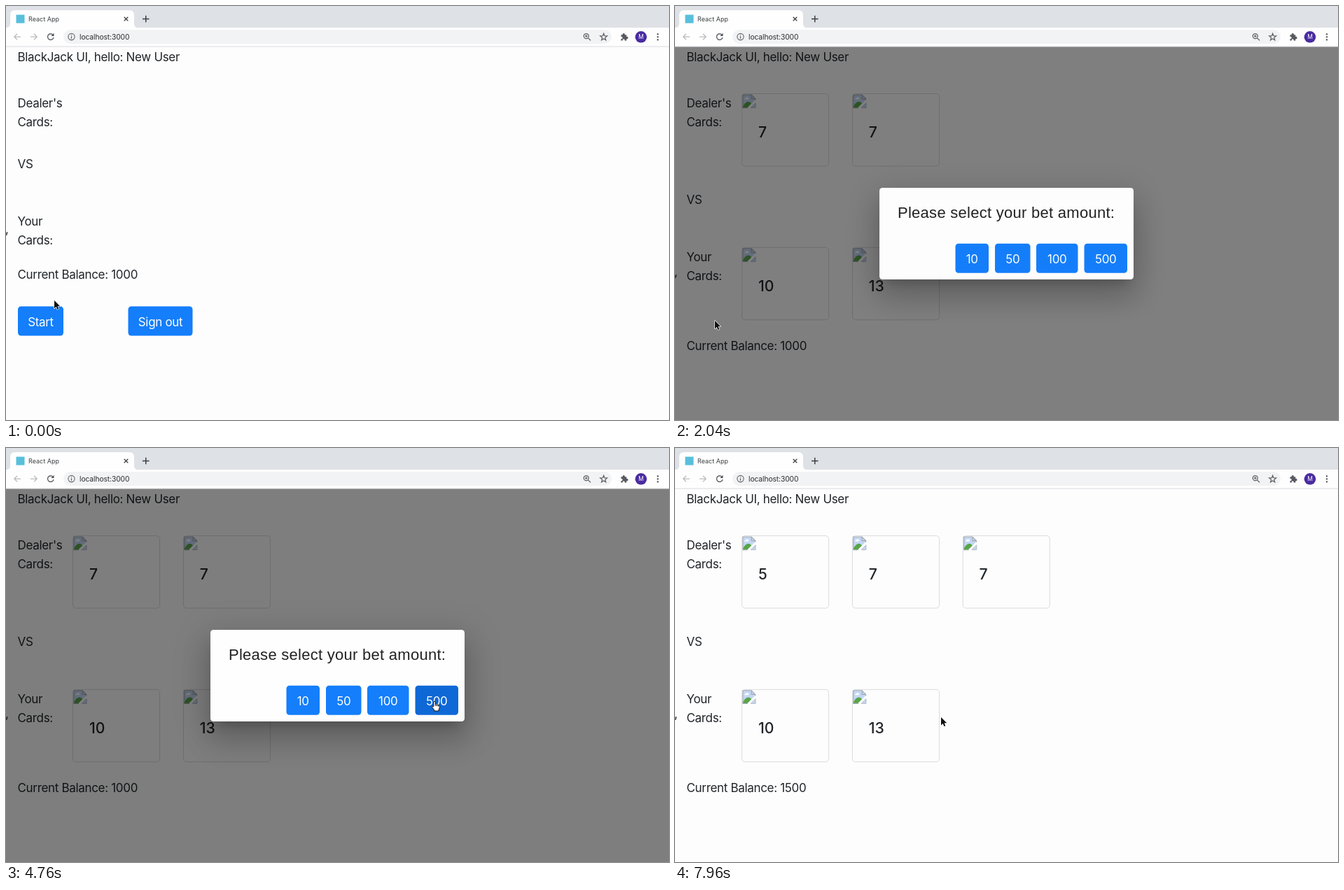
An HTML page that plays this animation: 947x592 px, repeating every 8 s.

```html
<!DOCTYPE html>
<html lang="en">
<head>
<meta charset="utf-8">
<title>Blackjack table</title>
<style>
  html, body { margin: 0; width: 100%; height: 100%; overflow: hidden; background: #fdfdfe; }
  svg { display: block; }
  text { font-family: Inter, Roboto, sans-serif; font-size: 17px; letter-spacing: -.019em; fill: #212529; white-space: pre; }
  .label { text-anchor: middle; fill: #fff; }
  .value { font-size: 21.2px; font-weight: 500; letter-spacing: 0; }
  .prompt { font-family: "Liberation Sans", Arial, sans-serif; font-size: 22px; letter-spacing: .0124em; fill: #222; }
  .icon { fill: none; stroke: #5f6368; stroke-width: 1.25; }
</style>
</head>
<body>
<svg id="stage" width="947" height="592" viewBox="0 0 947 592" xmlns="http://www.w3.org/2000/svg">
  <defs>
    <g id="broken">
      <path d="M.7.7H13L18.6 6.3V10L9 19.3H.7Z" fill="#c3d7f5"/>
      <path d="M3 7.2q.2-2 2.1-2 .8-2 2.8-1 1.600.8 1.200 3Z" fill="#fff"/>
      <path d="M.7 17.500Q4.500 10.500 8.500 10.500 11.500 10.500 13.800 14.500L9 19.300H.7Z" fill="#58a548"/>
      <path d="M19.300 8.500 8 19.800" stroke="#fdfdfe" stroke-width="2.200"/>
      <path d="M7.500 19.300H.7V.7H13L18.600 6.300V8.500M13 .7V6.300H18.600" fill="none" stroke="#a5a9ae" stroke-width="1.100"/>
      <path d="M18.900 12.500V19.300H12Z" fill="#c3d7f5" stroke="#a5a9ae" stroke-width=".7"/>
    </g>
    <filter id="soft1" x="-20%" y="-50%" width="140%" height="200%"><feGaussianBlur stdDeviation="8"/></filter>
    <filter id="soft2" x="-30%" y="-80%" width="160%" height="260%"><feGaussianBlur stdDeviation="21"/></filter>
    <filter id="soft3" x="-30%" y="-80%" width="160%" height="260%"><feGaussianBlur stdDeviation="25"/></filter>
  </defs>

  <rect width="947" height="592" fill="#fdfdfe"/>
  <text x="16.500" y="78.500">BlackJack UI, hello: New User</text>
  <text x="16.500" y="145.300">Dealer's</text>
  <text x="16.500" y="171.800">Cards:</text>
  <g id="cards"></g>
  <g id="lower">
    <text x="16.500" y="231.500">VS</text>
    <text x="16.500" y="314">Your</text>
    <text x="16.500" y="340.500">Cards:</text>
  </g>
  <text id="balance" x="16.500"></text>
  <text id="comma" x="-1">,</text>
  <g id="actions"></g>

  <rect id="shade" y="58" width="947" height="534"/>
  <g id="dialog">
    <rect x="299.700" y="280" width="347.600" height="115" opacity=".2" filter="url(#soft1)"/>
    <rect x="289" y="283" width="370" height="138" opacity=".14" filter="url(#soft2)"/>
    <rect x="283" y="261" width="381" height="149" opacity=".12" filter="url(#soft3)"/>
    <rect x="292" y="260" width="363" height="131" rx="4.400" fill="#fefefe"/>
    <text class="prompt" x="318" y="303">Please select your bet amount:</text>
    <g id="bets"></g>
  </g>

  <g id="browser">
    <rect width="947" height="31" fill="#dee1e5"/>
    <path d="M0 31Q6 31 6 25V13Q6 6 13 6H176Q183 6 183 13V25Q183 31 189 31H947V58H0Z" fill="#fefefe"/>
    <path d="M0 58H947" stroke="#d9dadd"/>
    <rect x="14.500" y="12.500" width="12" height="12" fill="#58bfdc"/>
    <text x="32" y="21.500" style="font-size:9px;letter-spacing:0;fill:#3c4043">React App</text>
    <path class="icon" d="M168.700 15.700l5.600 5.600m0-5.600-5.600 5.600" style="stroke:#3c4043"/>
    <path class="icon" d="M195 18.500H204.500M199.750 13.750V23.250" style="stroke:#3c4043;stroke-width:1.500"/>
    <rect x="82" y="34" width="783" height="20" rx="10" fill="#f1f3f4"/>
    <path class="icon" d="M21 44H12M16 39.800 11.800 44 16 48.200M35 44H44M40 39.800 44.200 44 40 48.200" style="stroke:#b9bbbe"/>
    <path class="icon" d="M67 41.200A4.300 4.300 0 1 0 68 45" style="stroke-width:1.400"/>
    <path d="M68.500 38.800V43H64.300Z" fill="#4d5156"/>
    <circle class="icon" cx="93.500" cy="44" r="4.600" style="stroke-width:1.100"/>
    <path class="icon" d="M93.500 43.200V46.700M93.500 41.200V42.300"/>
    <text x="105" y="47.800" style="font-size:10.300px;letter-spacing:-.01em;fill:#2b2d30">localhost:3000</text>
    <circle class="icon" cx="828.800" cy="43" r="3.500"/>
    <path class="icon" d="M831.400 45.600 835 49.200M827 43H830.600M828.800 41.200V44.800"/>
    <path id="star" class="icon"/>
    <path d="M878.500 41.300h2.200a1.700 1.700 0 1 1 3.200 0h2.400v2.600a1.700 1.700 0 1 1 0 3.200v2.400h-2.600a1.600 1.600 0 1 0-2.900 0h-2.300v-2.600a1.600 1.600 0 1 0 0-3Z" fill="#565a5f"/>
    <circle cx="907" cy="44.300" r="8.300" fill="#4a2ba0"/>
    <text class="label" x="907" y="47.400" style="font-size:8.500px">M</text>
    <g fill="#5f6368"><circle cx="931" cy="40.300" r="1.200"/><circle cx="931" cy="44.300" r="1.200"/><circle cx="931" cy="48.300" r="1.200"/></g>
  </g>

  <g id="pointer" stroke-linejoin="round">
    <path id="arrow" d="M0 0V11.500L2.700 9 4.400 13 6.300 12.200 4.600 8.300H8.200Z" fill="#111" stroke="#fff" stroke-width="1.300" paint-order="stroke"/>
    <path id="hand" d="M-1.300 1Q0-.8 1.200 1V4.500Q2.600 3.700 3.400 5 4.800 4.500 5.400 5.600 7.200 5.300 7.200 7.200V9.500L6 12.700V14H-.2V12.800L-3.600 8.300Q-3.600 6.500-1.300 8Z M1.200 4.500V7M3.400 5V7.200M5.400 5.600V7.600" fill="#fff" stroke="#111" stroke-width="1"/>
  </g>
</svg>
<script>
const LOOP = 8000;
const START = 1840, BET = 4860, STAND = 6600;
const BLUE = [20, 126, 251], DARK = [14, 104, 214];
const NS = "http://www.w3.org/2000/svg";
const $ = id => document.getElementById(id);

// time, x, y of the pointer's resting and turning points
const PATH = [
  [0, 69, 421], [800, 61, 448], [1160, 61, 448], [1400, 59, 450],
  [1900, 57, 450], [2160, 57, 450], [2840, 410, 410], [3640, 608, 360],
  [4480, 612, 362], [5440, 612, 362], [6240, 211, 552], [6760, 211, 552], [7700, 380, 385]
];

function add(parent, name, attrs, content = "") {
  const node = document.createElementNS(NS, name);
  for (const key in attrs) node.setAttribute(key, attrs[key]);
  node.textContent = content;
  parent.append(node);
  return node;
}

function makeButton(parent, label, x, y, w, phase) {
  const group = add(parent, "g", {});
  const rect = add(group, "rect", { x, y, width: w, height: 42, rx: 4.4 });
  add(group, "text", { x: x + w / 2, y: y + 28, class: "label" }, label);
  return { group, rect, x, y, w, phase };
}

function makeCard(x, y) {
  const group = add($("cards"), "g", { transform: `translate(${x} ${y})` });
  add(group, "rect", { width: 124, height: 103.5, rx: 4.4, fill: "none", stroke: "#dbdbdc" });
  add(group, "use", { href: "#broken", x: .6, y: .8 });
  const value = add(group, "text", { x: 23.3, y: 62.8, class: "value" });
  return { group, value };
}

const buttons = [
  makeButton($("actions"), "Start", 17, 429.5, 65, "idle"),
  makeButton($("actions"), "Sign out", 174.5, 429.5, 92, "idle"),
  makeButton($("actions"), "Hit", 17, 531.5, 50.5, "play"),
  makeButton($("actions"), "Stand", 174.5, 531.5, 74, "play"),
  makeButton($("bets"), "10", 400.5, 339.7, 47.5, "bet"),
  makeButton($("bets"), "50", 457, 339.7, 50.5, "bet"),
  makeButton($("bets"), "100", 516, 339.7, 59.5, "bet"),
  makeButton($("bets"), "500", 584.5, 339.7, 61.5, "bet")
];
const dealer = [0, 1, 2].map(i => makeCard(95.6 + 157.83 * i, 125.5));
const player = [0, 1].map(i => makeCard(95.6 + 157.83 * i, 345.3));

const starPoints = Array.from({ length: 10 }, (_, i) => {
  const r = i % 2 ? 2.2 : 5.2, a = i * Math.PI / 5;
  return (853.7 + r * Math.sin(a)).toFixed(2) + " " + (44.5 - r * Math.cos(a)).toFixed(2);
});
$("star").setAttribute("d", "M" + starPoints.join("L") + "Z");

const clamp = v => Math.max(0, Math.min(1, v));
const smooth = v => v * v * (3 - 2 * v);

// cubic-bezier(.4, 0, .2, 1)
function standardEase(x) {
  let lo = 0, hi = 1;
  for (let i = 0; i < 18; i++) {
    const s = (lo + hi) / 2, r = 1 - s;
    if (3 * r * r * s * .4 + 3 * r * s * s * .2 + s ** 3 < x) lo = s; else hi = s;
  }
  return 3 * (1 - lo) * lo * lo + lo ** 3;
}

function pointerAt(t) {
  const i = PATH.findIndex(p => p[0] > t);
  if (i < 0) return PATH[PATH.length - 1].slice(1);
  if (i === 0) return PATH[0].slice(1);
  const [a, b] = [PATH[i - 1], PATH[i]];
  const k = smooth((t - a[0]) / (b[0] - a[0]));
  return [a[1] + (b[1] - a[1]) * k, a[2] + (b[2] - a[2]) * k];
}

function phaseAt(t) {
  return t < START ? "idle" : t < BET ? "bet" : t < STAND ? "play" : "done";
}

function isOver(button, t) {
  const [x, y] = pointerAt(t);
  return phaseAt(t) === button.phase &&
    x >= button.x && x <= button.x + button.w && y >= button.y && y <= button.y + 42;
}

// share of the last 150 ms spent over the button
function hoverAmount(button, t) {
  let sum = 0;
  for (let i = 0; i < 10; i++) sum += isOver(button, t - i * 15);
  return smooth(sum / 10);
}

function show(node, on) {
  node.setAttribute("display", on ? "inline" : "none");
}

function setCards(cards, values) {
  cards.forEach((card, i) => {
    show(card.group, i < values.length);
    card.value.textContent = values[i] ?? "";
  });
}

function render(t) {
  const phase = phaseAt(t), idle = phase === "idle";
  const shift = idle ? 0 : 51;
  $("lower").setAttribute("transform", `translate(0 ${shift})`);
  $("balance").setAttribute("y", idle ? 389.7 : 491.7);
  $("balance").textContent = "Current Balance: " + { idle: 1000, bet: 1000, play: 500, done: 1500 }[phase];
  $("comma").setAttribute("y", { idle: 325, bet: 386, play: 427, done: 386 }[phase]);
  setCards(dealer, idle ? [] : phase === "done" ? [5, 7, 7] : [7, 7]);
  setCards(player, idle ? [] : [10, 13]);

  for (const b of buttons) {
    if (b.phase !== "bet") show(b.group, b.phase === phase);
    const k = hoverAmount(b, t);
    b.rect.setAttribute("fill", `rgb(${BLUE.map((c, i) => Math.round(c + (DARK[i] - c) * k))})`);
  }

  const fade = t < BET
    ? standardEase(clamp((t - START) / 225))
    : 1 - standardEase(clamp((t - BET) / 195));
  $("shade").setAttribute("opacity", fade * .5);
  $("dialog").setAttribute("opacity", fade);
  show($("dialog"), fade > 0);

  const [x, y] = pointerAt(t);
  const over = buttons.some(b => isOver(b, t));
  $("pointer").setAttribute("transform", `translate(${x.toFixed(1)} ${y.toFixed(1)})`);
  show($("hand"), over);
  show($("arrow"), !over);
}

const began = performance.now();
function tick() {
  render((performance.now() - began) % LOOP);
  requestAnimationFrame(tick);
}
render(0);
requestAnimationFrame(tick);
</script>
</body>
</html>
```
